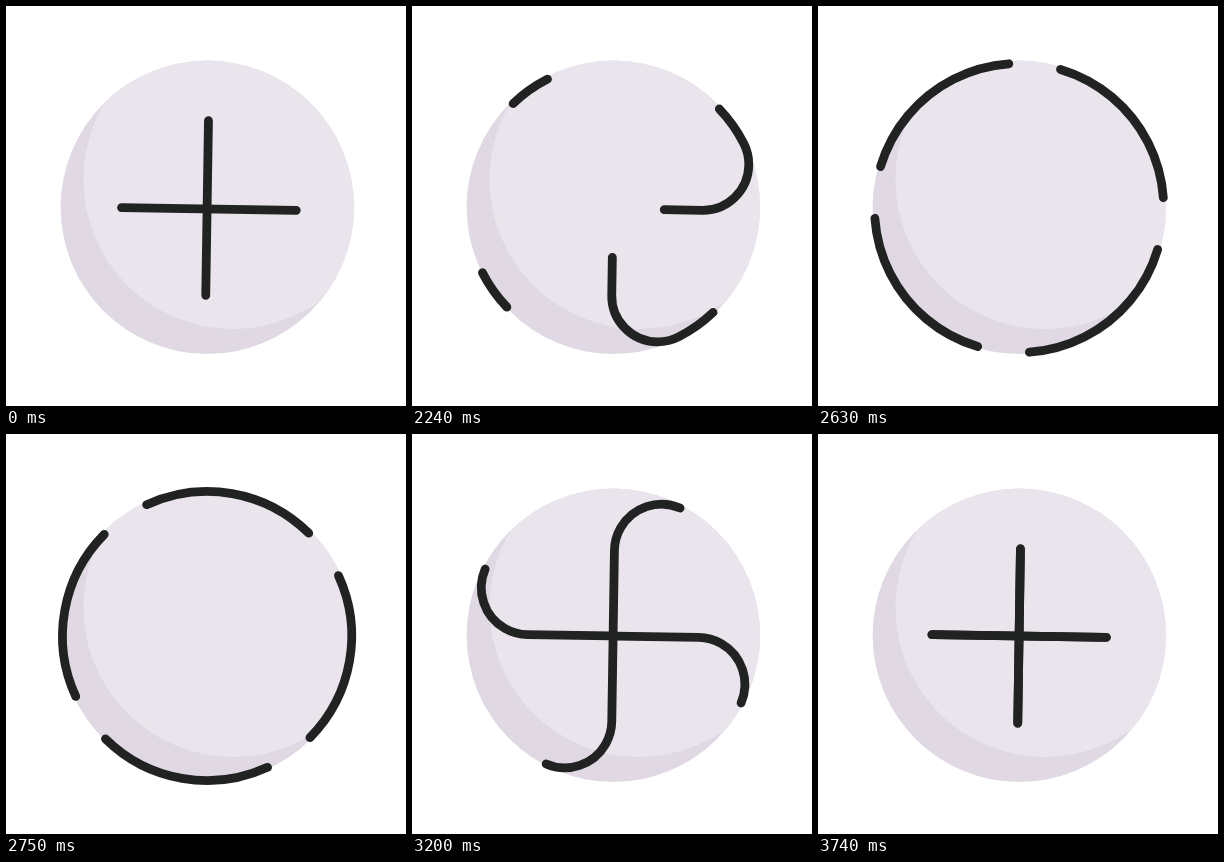
An HTML page with a canvas that plays this animation: 400x400 px, repeating every 3890 ms.

```html
<!DOCTYPE html>
<html lang="en">
<head>
<meta charset="utf-8">
<title>Plus loop</title>
<style>
  html, body { margin: 0; width: 100%; height: 100%; overflow: hidden; background: #fff; }
  canvas { display: block; }
</style>
</head>
<body>
<canvas id="stage" width="400" height="400"></canvas>
<script>
const ctx = document.getElementById('stage').getContext('2d');
const LOOP = 3890, START = 2000, STEP = 30, END = 1740;
const RIM = 144.6;      // radius of the orbit
const DASH = 174.8;     // length of each stroke
const OUT = 46, IN = 47; // bend radii when leaving and entering the cross
const TILT = 0.0155;

// Distance from the centre at which a bend touching the rim meets its line
const reach = r => Math.sqrt(RIM * RIM - 2 * RIM * r);
const clamp = x => Math.min(1, Math.max(0, x));
const outY = reach(OUT), inX = reach(IN);
const outAngle = Math.atan2(outY, OUT);
const inAngle = Math.atan2(-IN, -inX);

// Down the cross, around the rim, then back in from the left
const track = new Path2D();
track.moveTo(0, -DASH / 2);
track.lineTo(0, outY);
track.arc(OUT, outY, OUT, Math.PI, outAngle, true);
track.arc(0, 0, RIM, outAngle, inAngle, true);
track.arc(-inX, -IN, IN, inAngle, Math.PI / 2, true);
track.lineTo(DASH / 2, 0);

const rimStart = DASH / 2 + outY + OUT * (Math.PI - outAngle);

// Time in ms, distance travelled, speed
const keys = [
  [0, 0, 0.68], [30, 20.5, 0.62], [450, 275, 0.83], [630, 438.4, 0.89],
  [900, 657.4, 0.68], [1200, 812.5, 0.36], [1620, 902.4, 0.015], [END, 903.2, 0]
];

function travel(t) {
  const i = Math.max(1, keys.findIndex(k => k[0] >= t));
  const [t0, s0, v0] = keys[i - 1], [t1, s1, v1] = keys[i];
  const d = t1 - t0, u = (t - t0) / d, w = 1 - u;
  return w * w * ((1 + 2 * u) * s0 + u * d * v0) + u * u * ((3 - 2 * u) * s1 - w * d * v1);
}

function disc(x, y, r, color) {
  ctx.fillStyle = color;
  ctx.beginPath();
  ctx.arc(x, y, r, 0, 2 * Math.PI);
  ctx.fill();
}

function button() {
  ctx.save();
  disc(201.3, 201.3, 146.7, '#e0d9e4');
  ctx.clip();
  disc(227, 173.5, 149.5, '#eae5ec');
  ctx.restore();
}

// Strokes with a later "from" stay hidden until they reach the rim.
// "drift" moves the stroke's track off centre.
function stroke(turn, s, from, drift) {
  const tail = Math.max(s, from), length = s + DASH - tail;
  if (length <= 0) return;
  ctx.save();
  ctx.translate(201.1, 202);
  ctx.rotate(TILT - turn * Math.PI / 2);
  ctx.translate(-drift / 2, drift);
  ctx.setLineDash([length, 5000]);
  ctx.lineDashOffset = -tail;
  ctx.stroke(track);
  ctx.restore();
}

function draw(now) {
  const t = now % LOOP - START;
  const s = travel(Math.min(END, Math.max(0, Math.floor(t / STEP) * STEP)));
  const drift = 1.8 * clamp((438 - s) / 163);
  ctx.clearRect(0, 0, 400, 400);
  button();
  ctx.strokeStyle = '#212222';
  ctx.lineWidth = 8.8;
  ctx.lineCap = 'round';
  stroke(0, s, 0, 0);
  stroke(1, s, 0, drift);
  stroke(2, s, rimStart, 0);
  stroke(3, s, rimStart, drift);
}

const origin = performance.now();
function tick() {
  draw(performance.now() - origin);
  requestAnimationFrame(tick);
}
tick();
</script>
</body>
</html>
```
